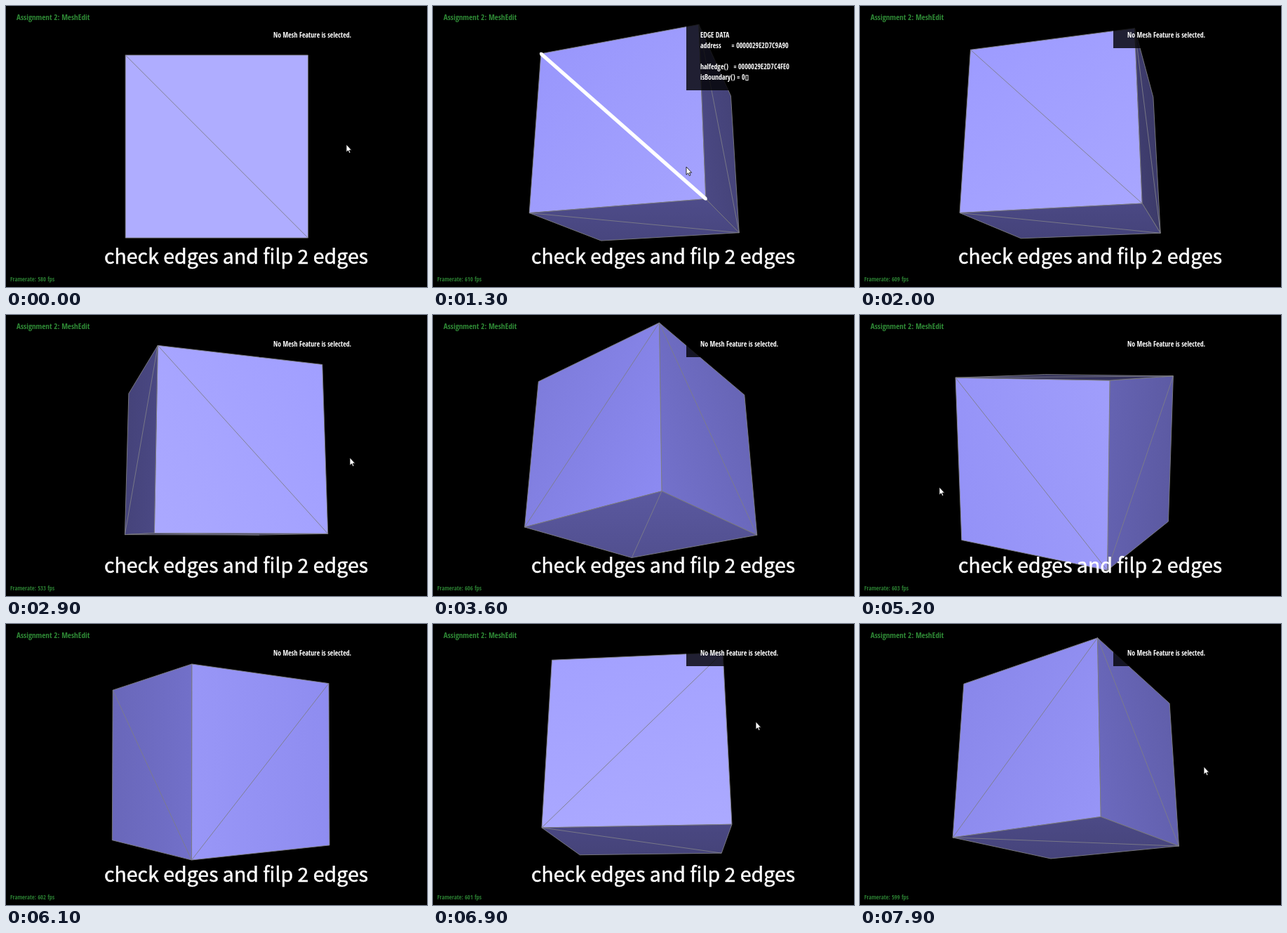
Recreate the animation shown at these times as an HTML page. Size 600 px wide and 400 px high, loop 8 s.

```html
<!DOCTYPE html>
<html lang="en">
<head>
<meta charset="utf-8">
<title>MeshEdit</title>
<style>
  html, body { margin: 0; width: 100%; height: 100%; overflow: hidden; background: #000; }
  svg { display: block; width: 600px; height: 400px; }
  text { white-space: pre; }
  .ui { font-family: "Open Sans Condensed", "Open Sans", "Roboto Condensed", sans-serif; font-stretch: condensed; font-weight: 700; }
  .green { fill: #2f8b36; }
  .info { fill: #fff; font-size: 9.9px; }
  #caption { font: 28.5px "Noto Sans CJK SC", "Noto Sans", sans-serif; fill: #fff; stroke: #fff; stroke-width: .5px; text-anchor: middle; }
</style>
</head>
<body>
<svg viewBox="0 0 600 400">
  <rect width="600" height="400"/>
  <g id="cube"></g>
  <rect id="panel" x="361" y="20" width="219" height="40" fill-opacity=".8"/>
  <text class="ui green" x="15" y="20" font-size="11.1">Assignment 2: MeshEdit</text>
  <text class="ui green" id="fps" x="6" y="392" font-size="8.6" fill-opacity=".9"></text>
  <g class="ui info" id="info"></g>
  <text id="caption" x="328" y="367">check edges and filp 2 edges</text>
  <path id="cursor" d="M0 0V11.2L2.6 8.8L4.3 12.6L6 11.8L4.4 8.2H7.6Z" fill="#fff" stroke="#000" stroke-width=".8"/>
</svg>
<script>
const LOOP = 8000, STEP = 100, FOCAL = 748, EYE = 6.75, LIGHT = 14;
const FLIP_FRONT = 4800, FLIP_LEFT = 5000, CAPTION_END = 7400;
const $ = id => document.getElementById(id);

// Each face is spanned by its right and up directions; "flips" is when its diagonal turns.
const X = [1, 0, 0], Y = [0, 1, 0], Z = [0, 0, 1];
const neg = v => v.map(c => -c);
const dot = (a, b) => a[0] * b[0] + a[1] * b[1] + a[2] * b[2];
const cross = (a, b) => [a[1] * b[2] - a[2] * b[1], a[2] * b[0] - a[0] * b[2], a[0] * b[1] - a[1] * b[0]];
const front = { right: X, up: Y, flips: FLIP_FRONT };
const left = { right: Z, up: Y, rising: true, flips: FLIP_LEFT };
const faces = [
  front, left,
  { right: neg(Z), up: Y },
  { right: X, up: Z },
  { right: X, up: neg(Z) },
  { right: neg(X), up: Y }
];

// Gestures: from, to, then the yaw and pitch reached (positive pitch looks from below).
const drags = [
  [100, 500, -35, 30], [500, 900, -19.1, 19.4], [1900, 2700, 18.3, 9],
  [3000, 3500, 50, 27], [3500, 4200, 64.4, 5.8], [4200, 4500, 61, -10],
  [5700, 6700, -5, 18], [7400, 7700, -33, 18.5]
];
// Pointer moves: from, to, then the place reached.
const moves = [
  [100, 900, 490, 203], [1000, 1300, 361, 229], [1500, 1800, 490, 203],
  [4500, 4700, 401, 190], [4800, 4950, 246, 222], [5050, 5200, 113, 245],
  [5300, 5700, 580, 200], [6700, 6900, 460, 139], [7100, 7300, 575, 170], [7400, 7700, 490, 203]
];
const picks = [[1200, 1700, front], [4700, 4900, front], [4900, 5100, left]];

const within = t => ([from, to]) => t >= from && t < to;

function follow(steps, start, t) {
  return steps.reduce((at, [from, to, ...goal]) => {
    const k = Math.max(0, Math.min(1, (t - from) / (to - from)));
    return at.map((v, i) => v + (goal[i] - v) * k);
  }, start);
}

// Slow decline with short stalls at the start and when a new drag begins.
function frameRate(t) {
  const stall = at => Math.exp(-(((t - at) / 300) ** 2));
  return Math.round(612 - t * 0.00165 - 32 * stall(0) - 74 * stall(2900));
}

function rotate([x, y, z], yaw, pitch) {
  const cy = Math.cos(yaw), sy = Math.sin(yaw), cp = Math.cos(pitch), sp = Math.sin(pitch);
  const depth = z * cy - x * sy;
  return [x * cy + z * sy, -y * cp - depth * sp, depth * cp - y * sp];
}

function project([x, y, z]) {
  const scale = FOCAL / (EYE - z);
  return [300.3 + x * scale, 200 + y * scale];
}

function shade(light) {
  const r = 38 + 138 * light;
  return `rgb(${[r, r - 2, 66 + 246 * light].map(v => Math.round(Math.max(0, Math.min(255, v))))})`;
}

// A linear ramp fitted to the light at the four corners.
function gradient(id, pts, lights) {
  const mean = lights.reduce((a, b) => a + b) / 4;
  const [ax, ay] = [pts[0][0] - pts[2][0], pts[0][1] - pts[2][1]];
  const [bx, by] = [pts[1][0] - pts[3][0], pts[1][1] - pts[3][1]];
  const da = lights[0] - lights[2], db = lights[1] - lights[3], det = ax * by - ay * bx;
  const gx = (da * by - db * ay) / det, gy = (ax * db - bx * da) / det;
  const size = gx * gx + gy * gy;
  if (!(size > 1e-12)) return ["", shade(mean)];
  const cx = pts.reduce((s, p) => s + p[0], 0) / 4, cy = pts.reduce((s, p) => s + p[1], 0) / 4;
  const range = 0.12, dx = gx * range / size, dy = gy * range / size;
  return [`<linearGradient id="${id}" gradientUnits="userSpaceOnUse" x1="${cx - dx}" y1="${cy - dy}" x2="${cx + dx}" y2="${cy + dy}">
    <stop stop-color="${shade(mean - range)}"/><stop offset="1" stop-color="${shade(mean + range)}"/></linearGradient>`, `url(#${id})`];
}

function line(a, b, stroke, width, cap = "butt") {
  return `<path d="M${a}L${b}" stroke="${stroke}" stroke-width="${width}" stroke-linecap="${cap}"/>`;
}

function drawCube(t, picked) {
  const [yaw, pitch] = follow(drags, [0, 0], t).map(deg => deg * Math.PI / 180);
  let out = "", top = "";
  faces.forEach((face, index) => {
    const [r, u] = [face.right, face.up].map(v => rotate(v, yaw, pitch));
    const normal = rotate(cross(face.right, face.up), yaw, pitch);
    if (normal[2] * EYE <= 1.001) return;
    const solid = [[-1, 1], [1, 1], [1, -1], [-1, -1]]
      .map(([a, b]) => normal.map((n, i) => n + a * r[i] + b * u[i]));
    const lights = solid.map(([x, y, z]) => {
      const ray = [-x, -y, LIGHT - z];
      return dot(ray, normal) / Math.hypot(...ray);
    });
    const pts = solid.map(project);
    const [def, fill] = gradient("ramp" + index, pts, lights);
    const rising = Boolean(face.rising) !== (t >= face.flips);
    const [a, b] = rising ? [pts[1], pts[3]] : [pts[0], pts[2]];
    out += `${def}<polygon points="${pts.join(" ")}" fill="${fill}" stroke="#7d7d80" stroke-width=".9" stroke-linejoin="round"/>`;
    out += line(a, b, "#7d7d88", 0.9);
    if (face === picked) top = line(a, b, "#fff", 5.2) + line(a, a, "#fff", 4, "round") + line(b, b, "#fff", 4, "round");
  });
  $("cube").innerHTML = out + top;
}

const idleInfo = ["No Mesh Feature is selected."];
const edgeInfo = ["EDGE DATA", "address      = 0000029E2D7C9A90", "",
  "halfedge()   = 0000029E2D7C4FE0", "isBoundary() = 0\u25af"];

function draw(t) {
  const pick = picks.find(within(t));
  drawCube(t, pick && pick[2]);
  $("panel").setAttribute("height", pick ? 100 : 40);
  $("info").innerHTML = (pick ? edgeInfo : idleInfo)
    .map((s, i) => `<text x="381" y="${45 + 15 * i}">${s}</text>`).join("");
  $("fps").textContent = `Framerate: ${frameRate(t)} fps`;
  $("caption").style.display = t < CAPTION_END ? "" : "none";
  $("cursor").setAttribute("transform", `translate(${follow(moves, [485, 197], t)})`);
  $("cursor").style.display = drags.some(within(t)) ? "none" : "";
}

const start = performance.now();
function tick() {
  const t = (performance.now() - start) % LOOP;
  draw(Math.floor(t / STEP) * STEP);
  requestAnimationFrame(tick);
}
tick();
</script>
</body>
</html>
```
